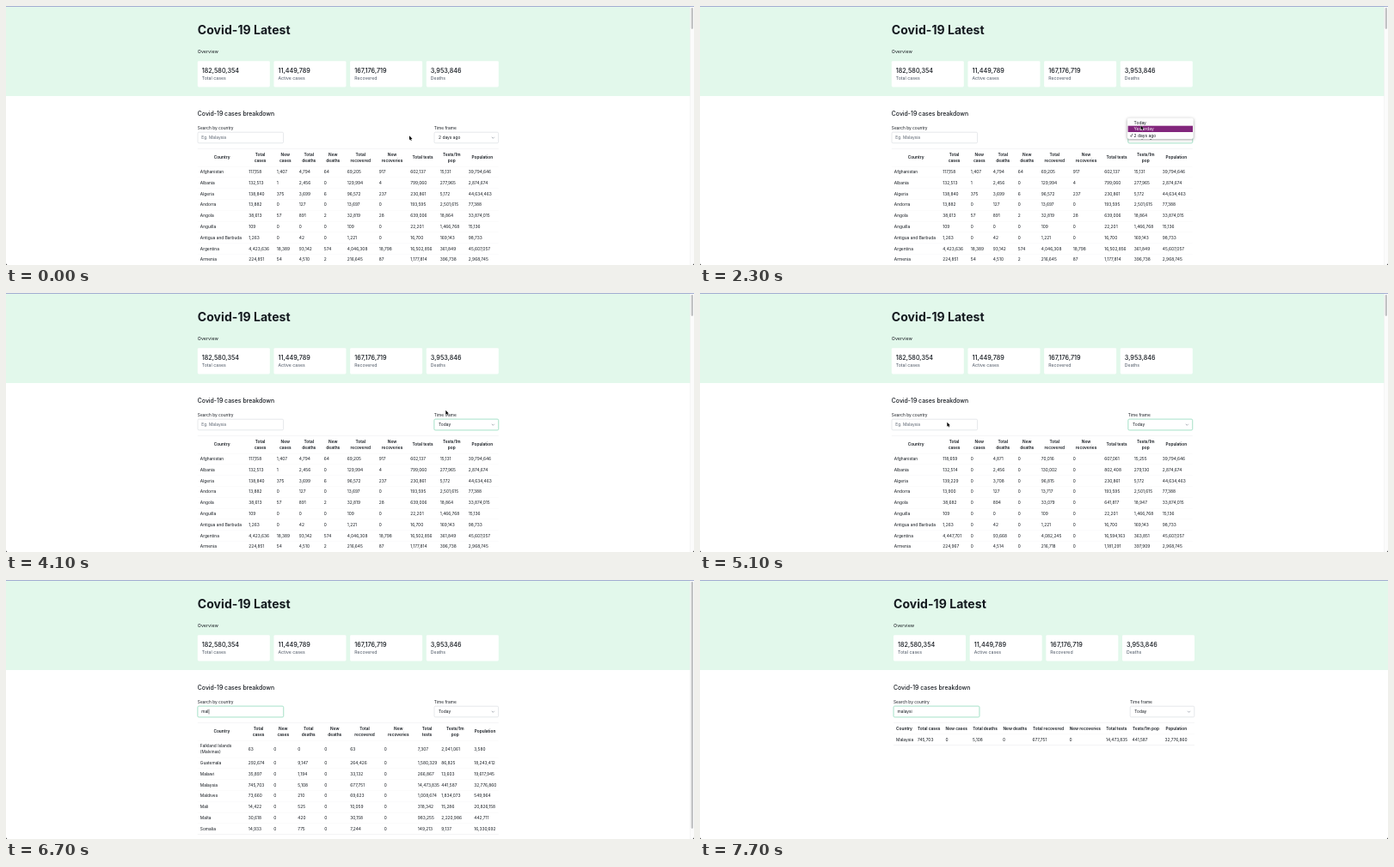
Recreate the animation shown at these times as an HTML page with a canvas. Size 800x302 px, loop 8000 ms.

```html
<!DOCTYPE html>
<html lang="en">
<head>
<meta charset="utf-8">
<title>Covid-19 Latest</title>
<style>
  html, body { margin: 0; width: 100%; height: 100%; overflow: hidden; background: #fff; }
  canvas { display: block; width: 100vw; height: 100vh; }
</style>
</head>
<body>
<canvas id="stage"></canvas>
<script>
const W = 800, H = 302, LOOP = 8000, BOX = 350, BAR = 4.4;
const FONT = 'Inter, "Open Sans", sans-serif';
const INK = '#14191f';
const canvas = document.getElementById('stage');
const ctx = canvas.getContext('2d');

const parse = s => s.trim().split('\n').map(line => line.trim().split('|'));

const OLDER = parse(`
  Afghanistan|117,158|1,407|4,794|64|69,205|917|602,137|15,131|39,794,646
  Albania|132,513|1|2,456|0|129,994|4|799,060|277,965|2,874,674
  Algeria|138,840|375|3,699|6|96,572|237|230,861|5,172|44,634,463
  Andorra|13,882|0|127|0|13,697|0|193,595|2,501,615|77,388
  Angola|38,613|57|891|2|32,819|28|639,006|18,864|33,874,015
  Anguilla|109|0|0|0|109|0|22,201|1,466,768|15,136
  Antigua and Barbuda|1,263|0|42|0|1,221|0|16,700|169,143|98,733
  Argentina|4,423,636|18,389|93,142|574|4,046,308|18,798|16,502,856|361,849|45,607,057
  Armenia|224,851|54|4,510|2|216,645|87|1,177,814|396,738|2,968,745`);

// Today's rows have no new cases, deaths or recoveries yet.
const withZeros = ([name, cases, deaths, healed, tests, perM, people]) =>
  [name, cases, '0', deaths, '0', healed, '0', tests, perM, people];

const TODAY = parse(`
  118,659|4,871|70,016|607,061|15,255
  132,514|2,456|130,002|802,408|279,130
  139,229|3,708|96,815|230,861|5,172
  13,900|127|13,717|193,595|2,501,615
  38,682|894|33,079|641,817|18,947
  109|0|109|22,201|1,466,768
  1,263|42|1,221|16,700|169,143
  4,447,701|93,668|4,082,245|16,594,163|363,851
  224,967|4,514|216,718|1,181,291|397,909`)
  .map((r, i) => withZeros([OLDER[i][0], ...r, OLDER[i][9]]));

const MATCHES = parse(`
  Falkland Islands (Malvinas)|63|0|63|7,307|2,041,061|3,580
  Guatemala|292,674|9,147|264,426|1,580,329|86,825|18,243,412
  Malawi|35,897|1,194|33,132|266,867|13,603|19,617,945
  Malaysia|745,703|5,108|677,751|14,473,835|441,587|32,776,860
  Maldives|73,660|210|69,623|1,008,674|1,834,073|549,964
  Mali|14,422|525|10,059|318,342|15,286|20,826,158
  Malta|30,618|420|30,158|983,255|2,220,986|442,711
  Somalia|14,933|775|7,244|149,213|9,137|16,330,692`).map(withZeros);

const HEADS = ['Country', 'Total cases', 'New cases', 'Total deaths', 'New deaths',
  'Total recovered', 'New recoveries', 'Total tests', 'Tests/1m pop', 'Population'];

// Column edges from the container's left side.
const FULL = [0, 56.5, 89, 115, 144, 171, 208, 244.5, 279, 312, 350];
const FILTERED = [0, 56, 85.5, 113.5, 144.5, 174.5, 214, 253, 280.5, 318.5, 350];
const SINGLE = [0, 25, 57.5, 89, 124, 158.5, 201.5, 244, 274.5, 312.5, 345];

const CARDS = [['182,580,354', 'Total cases'], ['11,449,789', 'Active cases'],
  ['167,176,719', 'Recovered'], ['3,953,846', 'Deaths']];

const TYPING = [[0, ''], [6600, 'ma'], [6700, 'mal'], [6800, 'mala'],
  [7000, 'malay'], [7200, 'malays'], [7400, 'malaysi']];

// Pointer path: time, x, y
const PATH = [[0, 469, 151.3], [1000, 469, 151.3], [1400, 505.5, 153], [1900, 505.5, 153],
  [2300, 512.5, 139.3], [2400, 512.5, 134.2], [2500, 512.5, 134.2], [2700, 512, 133.6],
  [3000, 512, 133.6], [3200, 511.3, 136.8], [4500, 511.3, 136.8], [5200, 250, 153], [8000, 250, 153]];

function pointerAt(t) {
  const i = Math.max(1, PATH.findIndex(p => p[0] > t));
  const [a, b] = [PATH[i - 1], PATH[i]];
  const k = (t - a[0]) / (b[0] - a[0]);
  return [a[1] + (b[1] - a[1]) * k, a[2] + (b[2] - a[2]) * k];
}

function rect(x, y, w, h, color) {
  ctx.fillStyle = color;
  ctx.fillRect(x, y, w, h);
}

function round(x, y, w, h, r) {
  ctx.beginPath();
  ctx.roundRect(x, y, w, h, r);
}

// cy is the middle of the capitals; the font is set large and scaled down for exact spacing.
function text(s, x, cy, size, { weight = 400, color = INK, align = 'left' } = {}) {
  ctx.save();
  ctx.translate(x, cy + size * 0.364);
  ctx.scale(0.1, 0.1);
  ctx.font = `${weight} ${size * 10}px ${FONT}`;
  ctx.textAlign = align;
  ctx.fillStyle = color;
  ctx.fillText(s, 0, 0);
  const width = ctx.measureText(s).width / 10;
  ctx.restore();
  return width;
}

function withShadow(color, blur, dy, draw) {
  ctx.save();
  ctx.shadowColor = color;
  ctx.shadowBlur = blur * scale;
  ctx.shadowOffsetY = dy * scale;
  draw();
  ctx.restore();
}

function field(x, w, focused) {
  if (focused) {
    round(x - 0.6, 146.4, w + 1.2, 14.2, 2);
    ctx.fillStyle = '#d5f3e6';
    ctx.fill();
  }
  round(x + 0.2, 147.2, w - 0.4, 12.6, 1.4);
  ctx.fillStyle = '#fff';
  ctx.fill();
  ctx.lineWidth = 0.5;
  ctx.strokeStyle = focused ? '#7fd0ae' : '#cdd1d6';
  ctx.stroke();
}

function chevron(x, y) {
  ctx.beginPath();
  ctx.moveTo(x - 1.5, y - 0.7);
  ctx.lineTo(x, y + 0.8);
  ctx.lineTo(x + 1.5, y - 0.7);
  ctx.lineWidth = 0.55;
  ctx.strokeStyle = '#6b7280';
  ctx.stroke();
}

function header(left, width, crisp) {
  rect(0, 0, width, crisp ? 104.5 : 105, crisp ? '#e6f6ef' : '#e2f8eb');
  text('Covid-19 Latest', left, 28.2, 14.1, { weight: 700 });
  if (crisp) rect(left, 41.2, BOX, 0.7, '#c3d6cd');
  text('Overview', left, 53, 5.4);
  CARDS.forEach(([value, label], i) => {
    const x = left + i * (84 + 14 / 3);
    const card = () => {
      round(x, 64.2, 84, 30.2, 1.4);
      ctx.fillStyle = '#fff';
      ctx.fill();
    };
    if (crisp) withShadow('rgba(40,70,60,.28)', 3, 1.3, card);
    else card();
    text(value, x + 5, 75, 7.25, { weight: 500 });
    text(label, x + 5, 84.4, 5.2, { color: '#4b5563' });
  });
}

function controls(left, t, query) {
  text('Covid-19 cases breakdown', left, 125, 6.9, { weight: 500 });
  text('Search by country', left, 142, 4.82);
  text('Time frame', left + 275, 142, 4.8);

  field(left, 100, t >= 5400);
  if (query) {
    const w = text(query, left + 4.5, 153.5, 4.85);
    if (t < 7700) rect(left + 4.8 + w, 150.6, 0.5, 5.8, INK);
  } else {
    text('Eg. Malaysia', left + 4.5, 153.5, 4.85, { color: '#5d6672' });
  }

  field(left + 275, 75, t >= 1900 && t < 5400);
  text(t < 3000 ? '2 days ago' : 'Today', left + 280.3, 153.5, 4.85);
  chevron(left + 343.5, 153.5);
}

function table(left, rows, edges) {
  const oneLine = edges === SINGLE;
  const mid = oneLine ? 173 : 176.6;
  rect(left, 166.2, BOX, 0.5, '#ebedef');
  HEADS.forEach((head, i) => {
    const x = left + (edges[i] + edges[i + 1]) / 2;
    const style = { weight: 600, align: 'center' };
    const wrap = !oneLine && head.includes(' ') && !(edges === FULL && i === 7);
    const lines = wrap ? head.split(' ') : [head];
    lines.forEach((s, n) => text(s, x, mid + (n - (lines.length - 1) / 2) * 7.3, 4.8, style));
  });

  let top = oneLine ? 179.4 : 186.9;
  for (const row of rows) {
    const tall = row[0].includes('(');
    const h = tall ? 20 : 12.8;
    const cy = top + h / 2;
    rect(left, top, BOX, 0.4, '#f4f5f6');
    row.forEach((s, i) => {
      const x = left + edges[i] + 3;
      if (i || !tall) return text(s, x, cy, 4.85);
      const [a, b] = s.split(' (');
      text(a, x, cy - 3.7, 4.85);
      text('(' + b, x, cy + 3.7, 4.85);
    });
    top += h;
  }
  rect(left, top, BOX, 0.5, '#e7e9eb');
}

function menu(left, t) {
  const x = left + 274;
  const active = t < 2100 ? 2 : t < 2400 ? 1 : 0;
  withShadow('rgba(0,0,0,.4)', 3.5, 0.8, () => {
    round(x, 130.6, 77, 24.4, 2);
    ctx.fillStyle = '#fdfdfd';
    ctx.fill();
  });
  ['Today', 'Yesterday', '2 days ago'].forEach((s, i) => {
    const cy = 136 + i * 7.4;
    const color = i === active ? '#fff' : INK;
    if (i === active) rect(x + 0.8, cy - 3.7, 75.4, 7.3, '#82267c');
    text(s, x + 7.8, cy, 4.95, { color });
    if (i < 2) return;
    ctx.beginPath();
    ctx.moveTo(x + 3.6, cy + 0.2);
    ctx.lineTo(x + 4.6, cy + 1.6);
    ctx.lineTo(x + 6.2, cy - 1.9);
    ctx.lineWidth = 0.6;
    ctx.strokeStyle = color;
    ctx.stroke();
  });
}

function pointer(x, y) {
  ctx.beginPath();
  [[0, 0], [0, 5], [1.1, 4], [1.9, 5.8], [2.7, 5.4], [2, 3.7], [3.5, 3.6]]
    .forEach(([dx, dy]) => ctx.lineTo(x + dx, y + dy));
  ctx.closePath();
  ctx.lineJoin = 'round';
  ctx.lineWidth = 0.8;
  ctx.strokeStyle = '#fff';
  ctx.stroke();
  ctx.fillStyle = '#000';
  ctx.fill();
}

function frameEdges(thumb) {
  if (thumb) {
    rect(W - BAR, 0, BAR, H, '#fbfbfb');
    rect(W - BAR, 0, 0.4, H, '#e9e9e9');
    round(W - 3.3, 2, 2.3, thumb, 1.15);
    ctx.fillStyle = '#c1c2c4';
    ctx.fill();
  }
  rect(0, 0, W, 1, '#a3add2');
  for (const [x, d] of [[0, 1], [W, -1]]) {
    ctx.beginPath();
    ctx.moveTo(x, H - 2.6);
    ctx.quadraticCurveTo(x, H, x + d * 2.6, H);
    ctx.lineTo(x, H);
    ctx.fillStyle = '#111';
    ctx.fill();
  }
}

function tableFor(t, query) {
  if (query.length < 3) return [t < 4200 ? OLDER : TODAY, FULL, 25];
  const rows = MATCHES.filter(r => r[0].toLowerCase().includes(query));
  if (rows.length === 1) return [rows, SINGLE, 0];
  return [rows, FILTERED, rows.length > 5 ? 288 : 0];
}

let scale = 1;

function draw(now) {
  const dpr = window.devicePixelRatio || 1;
  const w = Math.round(innerWidth * dpr), h = Math.round(innerHeight * dpr);
  if (canvas.width !== w || canvas.height !== h) {
    canvas.width = w;
    canvas.height = h;
  }
  scale = w / W;
  ctx.setTransform(scale, 0, 0, h / H, 0, 0);
  rect(0, 0, W, H, '#fff');

  const t = Math.floor((now % LOOP) / 100) * 100;
  const query = TYPING.filter(k => k[0] <= t).pop()[1];
  const [rows, edges, thumb] = tableFor(t, query);
  const width = thumb ? W - BAR : W;
  const left = (width - BOX) / 2;

  header(left, width, t >= 400 && t < 1900);
  controls(left, t, query);
  table(left, rows, edges);
  if (t >= 1900 && t < 3000) menu(left, t);
  if (t < 5900) pointer(...pointerAt(t));
  frameEdges(thumb);
  requestAnimationFrame(draw);
}

requestAnimationFrame(draw);
</script>
</body>
</html>
```
